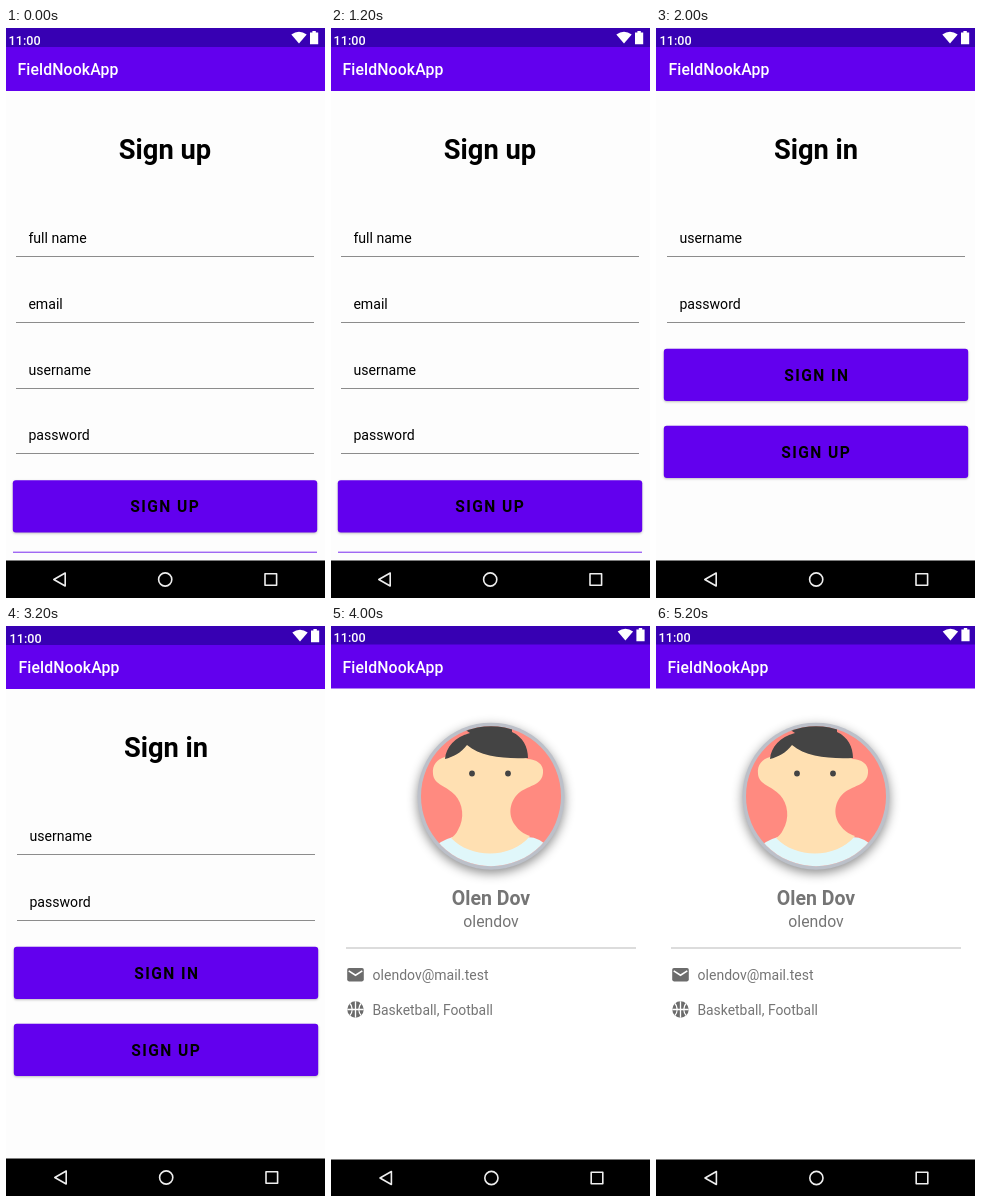
These frames come from a looping animation (319x570 px, 6000 ms). An HTML page with a canvas:

```html
<!DOCTYPE html>
<html lang="en">
<head>
<meta charset="utf-8">
<title>App screens</title>
<style>
  html, body { margin: 0; width: 100%; height: 100%; overflow: hidden; background: #fdfdfd; }
  canvas { display: block; width: 319px; height: 570px; }
</style>
</head>
<body>
<canvas id="stage" width="319" height="570"></canvas>
<script>
const ctx = document.getElementById('stage').getContext('2d');
const PURPLE = '#6200ee';
const GREY = '#757575';
const HOLD = 2000;

function rect(x, y, w, h, color) {
  ctx.fillStyle = color;
  ctx.fillRect(x, y, w, h);
}

function disc(x, y, r, color) {
  ctx.fillStyle = color;
  ctx.beginPath();
  ctx.arc(x, y, r, 0, Math.PI * 2);
  ctx.fill();
}

function shape(path, color) {
  ctx.fillStyle = color;
  ctx.fill(new Path2D(path));
}

function outline(path, color, width) {
  ctx.strokeStyle = color;
  ctx.lineWidth = width;
  ctx.stroke(new Path2D(path));
}

function text(str, x, y, size, { weight = 400, color = '#000', align = 'left', spacing = 0 } = {}) {
  ctx.font = `${weight} ${size}px Roboto, sans-serif`;
  ctx.letterSpacing = spacing + 'px';
  ctx.textAlign = align;
  ctx.fillStyle = color;
  ctx.fillText(str, x, y);
}

function shifted(dx, dy, draw) {
  ctx.save();
  ctx.translate(dx, dy);
  draw();
  ctx.restore();
}

function bars(statusEnd, headerEnd, navTop, background) {
  rect(0, 0, 319, 570, background);
  rect(0, 0, 319, headerEnd, PURPLE);
  rect(0, 0, 319, statusEnd, '#3700b3');
  rect(0, navTop, 319, 570 - navTop, '#000');
}

function statusIcons() {
  shape('M285.3 6.6 Q293 1 300.7 6.6 L293 15.6 Z', '#fff');
  shape('M304 4.5 h2.4 v-1.5 h3.4 v1.5 h2.4 v11.7 h-8.2 Z', '#fff');
}

function navIcons() {
  ctx.lineJoin = 'round';
  outline('M47.8 551.5 L59.2 545 V558 Z', '#eee', 1.6);
  outline('M165.8 551.5 a6.6 6.6 0 1 1 -13.2 0 a6.6 6.6 0 1 1 13.2 0', '#eee', 1.6);
  outline('M259 545.8 h11.6 v11.4 h-11.6 Z', '#eee', 1.6);
}

function chrome(titleX, titleY, clockX, clockY) {
  text('11:00', clockX, clockY, 12.6, { weight: 500, color: '#fff' });
  text('FieldNookApp', titleX, titleY, 15.8, { weight: 500, color: '#fff', spacing: 0.12 });
}

function field(label, row) {
  const y = 228 + Math.round(row * 65.8);
  text(label, 22.4, y - 13, 14.1);
  rect(10, y, 298, 1, '#8c8c8c');
}

function button(label, labelX, y) {
  ctx.save();
  ctx.shadowColor = 'rgba(0,0,0,.25)';
  ctx.shadowBlur = 2.5;
  ctx.shadowOffsetY = 1;
  ctx.fillStyle = PURPLE;
  ctx.beginPath();
  ctx.roundRect(6.8, y, 304.4, 52.3, 3);
  ctx.fill();
  ctx.restore();
  text(label, labelX, y + 32.2, 15.6, { weight: 700, spacing: 1.42 });
}

function formScreen(dx, heading, fields, drawButtons) {
  bars(19, 63, 532.5, '#fdfdfd');
  shifted(dx, 0, () => {
    statusIcons();
    navIcons();
    chrome(11.5, 47, 2.6, 16.8);
    text(heading, 159, 131, 27.3, { weight: 700, align: 'center' });
    fields.forEach(field);
    drawButtons();
  });
}

function signUp() {
  formScreen(0, 'Sign up', ['full name', 'email', 'username', 'password'], () => {
    button('SIGN UP', 124.3, 452.2);
    rect(7, 523.7, 304, 1, '#7a2bf0');
  });
}

function signIn() {
  formScreen(1, 'Sign in', ['username', 'password'], () => {
    button('SIGN IN', 127.2, 320.8);
    button('SIGN UP', 124.3, 397.8);
  });
}

function avatar() {
  const cx = 160, cy = 170.2;
  ctx.save();
  ctx.shadowColor = 'rgba(0,0,0,.45)';
  ctx.shadowBlur = 11;
  ctx.shadowOffsetY = 3.5;
  disc(cx, cy, 73.5, '#bcc0c9');
  ctx.restore();

  ctx.save();
  ctx.beginPath();
  ctx.arc(cx, cy, 70, 0, Math.PI * 2);
  ctx.clip();
  rect(85, 95, 150, 150, '#ff8a80');
  shape('M100 245 V224 Q110 214 122 211 H196 Q210 211 220 224 V245 Z', '#e0f7fa');
  shape('M114 131 C106 133 101 139 102 148 C103 159 116 160 124 169 ' +
        'C132 178 134 192 127 204 C125 208 123 210 120 212 ' +
        'C140 233 180 233 199 210 C193 208 188 205 184 199 ' +
        'C176 188 179 174 189 166 C199 159 211 159 212 147 ' +
        'C213 138 205 133 196 133 L180 108 H135 Z', '#ffe0b2');
  shape('M114 133 C115 121 124 111 139 107 L133 103 Q137 99 143 99 H181 V106 ' +
        'C192 111 197 121 197 132 C174 133 150 131 136 119 ' +
        'C130 127 122 131 114 133 Z', '#444');
  disc(141, 147.5, 2.9, '#444');
  disc(177, 147.5, 2.9, '#444');
  ctx.restore();
}

function mailIcon() {
  ctx.fillStyle = '#6c6c6c';
  ctx.beginPath();
  ctx.roundRect(16.2, 342, 16.6, 13.4, 1.8);
  ctx.fill();
  outline('M17.7 344.8 L24.5 349.2 L31.3 344.8', '#fff', 1.6);
}

function ballIcon() {
  ctx.save();
  disc(24.5, 383.5, 8.2, '#6c6c6c');
  ctx.clip();
  outline('M24.5 375 v17 M16 383.5 h17 M18 376 q6.5 7.5 0 15 M31 376 q-6.5 7.5 0 15', '#fff', 1.3);
  ctx.restore();
}

function profile() {
  bars(18.5, 62.5, 533.5, '#fff');
  shifted(1.4, -1, statusIcons);
  shifted(1.2, 0.5, navIcons);
  chrome(11.5, 46.5, 2.6, 15.9);
  avatar();
  text('Olen Dov', 160, 279, 19.5, { weight: 700, color: GREY, align: 'center' });
  text('olendov', 160, 301, 15.8, { color: GREY, align: 'center' });
  rect(15, 321, 290, 2, '#dcdcdc');
  mailIcon();
  ballIcon();
  text('olendov@mail.test', 41.6, 354, 14, { color: GREY });
  text('Basketball, Football', 41.4, 388.5, 13.9, { color: GREY });
}

const screens = [signUp, signIn, profile];
const start = performance.now();

function tick() {
  const elapsed = performance.now() - start;
  screens[Math.floor(elapsed / HOLD) % screens.length]();
  requestAnimationFrame(tick);
}
tick();
</script>
</body>
</html>
```
